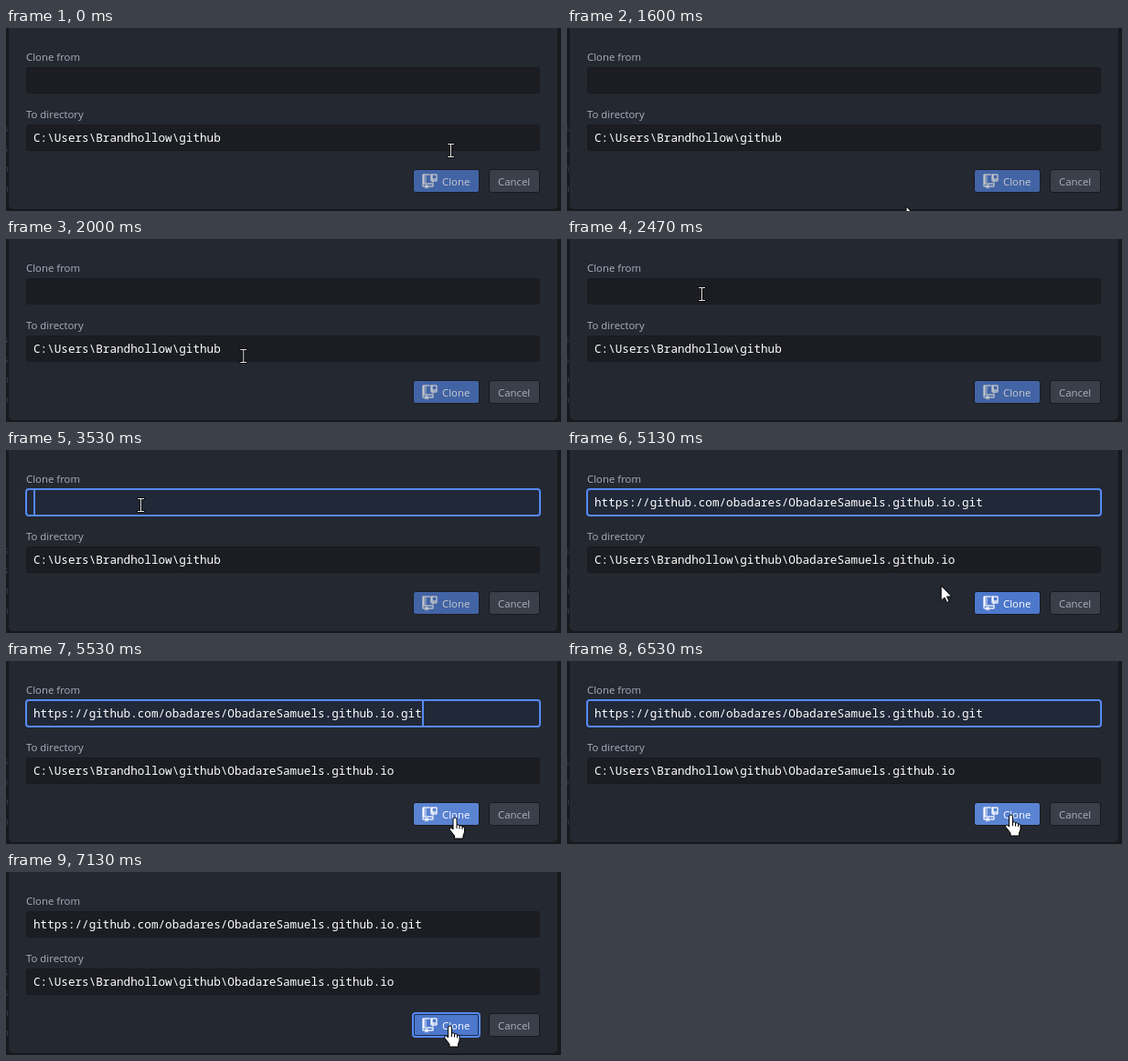
These frames come from a looping animation (607 by 201 pixels, 8000 ms). An HTML page:

```html
<!DOCTYPE html>
<html lang="en">
<head>
<meta charset="utf-8">
<title>Clone dialog</title>
<style>
  html, body { margin: 0; width: 100%; height: 100%; overflow: hidden; background: #18191d; }
  svg { display: block; }
  text { font: 11.4px "Open Sans", "Noto Sans", sans-serif; fill: #a9b1c0; white-space: pre; }
  .mono { font: 12.65px "Noto Sans Mono", "DejaVu Sans Mono", monospace; fill: #fff; }
  .behind { fill: #3b3e45; }
  .field { fill: #1b1d22; stroke: #181a1f; }
  .focus { fill: none; stroke: #568af2; stroke-width: 2; }
  #clone text { fill: #fff; font-weight: 500; }
  #clone path { fill: #fff; stroke: #fff; stroke-width: .25; }
  .cursor { fill: #fff; stroke: #000; }
</style>
</head>
<body>
<svg width="607" height="201" viewBox="0 0 607 201">
  <rect width="607" height="201" fill="#18191d"/>
  <text class="behind" x="-3" y="114">s</text>
  <text class="behind" x="-3" y="136">s</text>
  <text class="behind" x="-4" y="158">n</text>
  <text class="behind" x="-4" y="180">n</text>
  <rect x="3" y="-10" width="600" height="209" rx="5" fill="#242830"/>

  <text x="22" y="36">Clone from</text>
  <rect class="field" x="22.5" y="43.5" width="561" height="28" rx="2.5"/>
  <g id="fieldFocus">
    <rect class="focus" x="22" y="43" width="562" height="29" rx="3" style="fill: #212838"/>
    <rect id="caret" y="44" width="2" height="27" fill="#568af2"/>
  </g>
  <text class="mono" id="url" x="30" y="62"></text>
  <text x="22" y="99">To directory</text>
  <rect class="field" x="22.5" y="106.5" width="561" height="28" rx="2.5"/>
  <text class="mono" id="dir" x="30" y="125"></text>

  <g id="clone">
    <rect id="face" x="445.5" y="155.5" width="72" height="25" rx="2.5" stroke="#181a1f"/>
    <path transform="translate(455.5 160.5)" d="M15 0H9v7c0 .55.45 1 1 1h1v1h1V8h3c.55 0 1-.45 1-1V1c0-.55-.45-1-1-1zm-4 7h-1V6h1v1zm4 0h-3V6h3v1zm0-2h-4V1h4v4zM4 5H3V4h1v1zm0-2H3V2h1v1zM2 1h6V0H1C.45 0 0 .45 0 1v12c0 .55.45 1 1 1h2v2l1.5-1.5L6 16v-2h5c.55 0 1-.45 1-1v-3H2V1zm9 10v2H6v-1H3v1H1v-2h10zM3 8h1v1H3V8zm1-1H3V6h1v1z"/>
    <text x="477" y="172.5">Clone</text>
  </g>
  <g id="buttonFocus">
    <rect class="focus" x="445" y="155" width="73" height="26" rx="3"/>
    <rect x="446.5" y="156.5" width="70" height="23" rx="1.5" fill="none" stroke="#1a2b52"/>
  </g>
  <rect x="528.5" y="155.5" width="55" height="25" rx="2.5" fill="#3a3f4a" stroke="#181a1f"/>
  <text x="538" y="172.5">Cancel</text>

  <g id="beam" fill="none" stroke-linecap="square">
    <path stroke="#000" stroke-width="2.4" d="M-3-7H3M0-7V7M-3 7H3"/>
    <path stroke="#e8e8e8" d="M-3-7H3M0-7V7M-3 7H3"/>
  </g>
  <path class="cursor" id="arrow" d="M0 0V16.5L3.8 13 6.3 18.5 8.8 17.4 6.4 12H11.5Z"/>
  <path class="cursor" id="hand" d="M-2 2Q-2 0 0 0T2 2V8Q4.5 7 5 9 7.5 8 8 10 10.5 9.5 10.5 12V16L9 20V23H-.5V20L-5.5 13.5Q-6.5 11.5-5 11-4 10.5-2 13ZM2 8V12M5 9V12.5M8 10V13"/>
</svg>
<script>
const LOOP = 8000, STEP = 200 / 3;
const FOCUS = 2933, PASTE = 3867, PRESS = 6933, RELEASE = 7133;
const BLINKS = [FOCUS, 3133, 3533, 4200, 4600, 5000, 5400, 5733, 6133, 6533];
const REPO = "ObadareSamuels.github.io";
const URL_TEXT = `https://github.com/obadares/${REPO}.git`;
const DIR = "C:\\Users\\Brandhollow\\github";

// pointer hotspot: time, x, y
const TRACK = [
  [0, 486.5, 134.5], [67, 444, 174], [133, 400, 260], [1599, 400, 260],
  [1600, 371, 196], [2400, 148.5, 61], [2467, 147.5, 60.5], [4600, 147.5, 60.5],
  [5400, 501, 180], [5533, 491, 172], [5733, 485.5, 169], [LOOP, 485.5, 169]
];

const $ = id => document.getElementById(id);
const show = (id, on) => $(id).setAttribute("visibility", on ? "inherit" : "hidden");
const inside = ([x, y], l, t, r, b) => x >= l && x <= r && y >= t && y <= b;

function pointer(t) {
  const i = TRACK.findIndex(key => key[0] > t);
  const [t0, x0, y0] = TRACK[i - 1], [t1, x1, y1] = TRACK[i];
  const u = (t - t0) / (t1 - t0), e = u * u * (3 - 2 * u);
  return [x0 + (x1 - x0) * e, y0 + (y1 - y0) * e];
}

function draw(time) {
  const t = Math.round(Math.floor((time + 5) / STEP) * STEP) % LOOP;
  const pasted = t >= PASTE;
  const p = pointer(t);

  $("url").textContent = pasted ? URL_TEXT : "";
  $("dir").textContent = pasted ? `${DIR}\\${REPO}` : DIR;
  show("fieldFocus", t >= FOCUS && t < PRESS);
  show("caret", t >= FOCUS && t < PRESS && BLINKS.filter(b => b <= t).length % 2);
  $("caret").setAttribute("x", pasted ? 455 : 30);

  const overButton = inside(p, 445, 155, 518, 181);
  const overField = inside(p, 22, 43, 584, 72) || inside(p, 22, 106, 584, 135);
  $("clone").setAttribute("opacity", pasted ? 1 : 0.75);
  $("face").setAttribute("fill",
    t >= RELEASE ? "#4d78cc" : t >= PRESS ? "#4269b8" : overButton ? "#5a83d2" : "#4d78cc");
  show("buttonFocus", t >= PRESS);

  const kind = overButton ? "hand" : overField ? "beam" : "arrow";
  for (const id of ["hand", "beam", "arrow"]) {
    show(id, id === kind);
    $(id).setAttribute("transform", `translate(${p})`);
  }
}

const start = performance.now();
function frame() {
  draw((performance.now() - start) % LOOP);
  requestAnimationFrame(frame);
}
frame();
</script>
</body>
</html>
```
